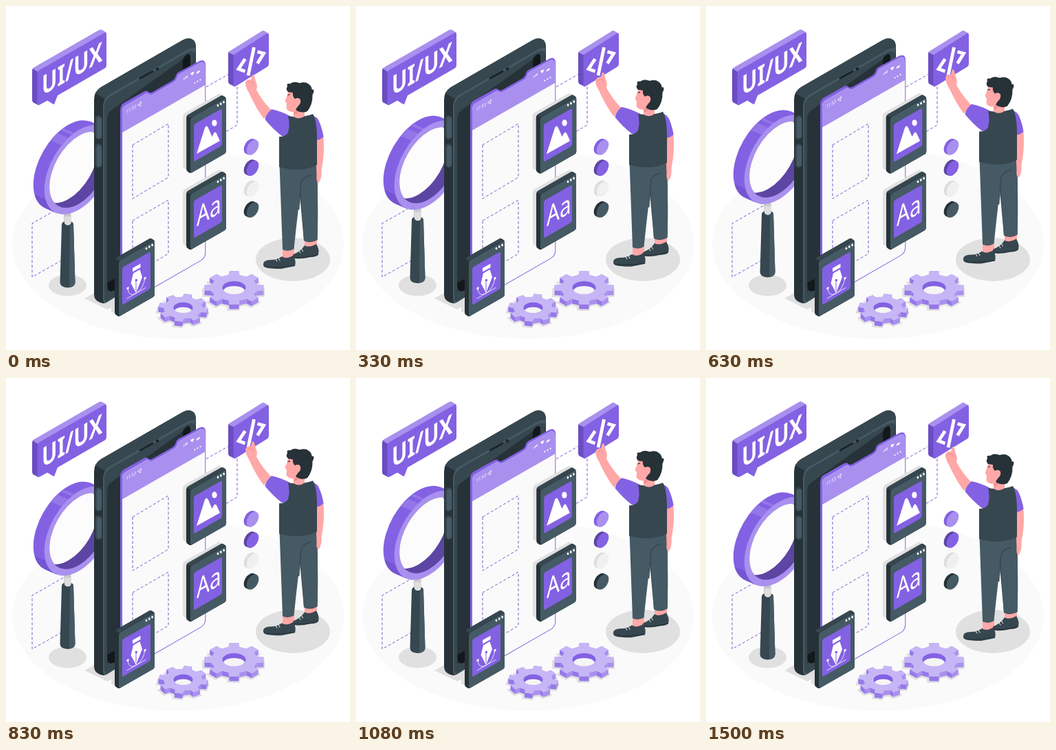
An HTML page that plays this animation: 500x500 px, repeating every 1540 ms.

```html
<!DOCTYPE html>
<html lang="en">
<head>
<meta charset="utf-8">
<title>UI/UX workspace</title>
<style>
html, body { margin: 0; width: 100%; height: 100%; overflow: hidden; background: #fff; }
svg { display: block; width: 100vw; height: 100vh; }
.p { fill: #8361e3 } .l { fill: #a990ef } .d { fill: #5d45a3 } .m { fill: #6a4dc0 }
.k { fill: #263238 } .g { fill: #37474f } .s { fill: #455a64 }
.skin { fill: #ffa8a7 } .w { fill: #fff } .sh { fill: #e0e0e0 }
.dash { fill: none; stroke: #7757cf; stroke-width: 1; stroke-dasharray: 4 3 }
.ln { fill: none; stroke: #fff; stroke-linecap: round; stroke-linejoin: round }
</style>
</head>
<body>
<svg viewBox="0 0 500 500" xmlns="http://www.w3.org/2000/svg">
<defs>
  <path id="shade" class="sh" d="M257 160Q257 157 260 155L308 128Q311 126 313 129L268 160V240L260 237Q257 236 257 233Z"/>
  <g id="card">
    <path class="k" d="M262 163Q262 159 265 157.500L312 130.500Q314 129 316 130.500L319 132.500Q320 133 320 136V211Q320 213.500 318 215L270 242.500Q268 243.500 266 242.500L264 241Q262 240 262 237Z"/>
    <path class="g" d="M263 159Q264 158 265 157.500L312 130.500Q314 129 316 130.500L319 132.500L268 162.500Z"/>
    <path class="s" d="M268 166Q268 163 270.500 161.500L317 134.500Q320 133 320 136V211Q320 213.500 318 215L270.500 242Q268 243 268 240Z"/>
    <path class="p" d="M273 175Q273 172.500 275 171L312 150Q314 149 314 151.500V200Q314 202.500 312 204L275 225.500Q273 226.500 273 224Z"/>
    <g class="w"><ellipse cx="308" cy="144.300" rx="1.300" ry="1.900"/><ellipse cx="312.300" cy="141.900" rx="1.300" ry="1.900"/><ellipse cx="316.600" cy="139.400" rx="1.300" ry="1.900"/></g>
  </g>
  <ellipse id="disc" rx="7.500" ry="12" transform="rotate(30)"/>
  <clipPath id="hole"><circle r="49.500" transform="matrix(.866 -.5 0 1 106 238)"/></clipPath>
</defs>

<ellipse cx="250" cy="346" rx="241" ry="138" fill="#fafafa"/>
<path class="dash" d="M89 287L38 316V394L89 365"/>
<g class="sh">
  <ellipse cx="89.500" cy="406" rx="27.500" ry="15.500"/>
  <ellipse cx="417" cy="368.500" rx="54" ry="31.500"/>
  <path d="M114 425L130 416L160 426V448L153 444V438L147 441Z"/>
</g>

<g id="glass">
  <path d="M84 298H94.500V318H84Z" fill="#c9c9c9"/>
  <path class="g" d="M81 318Q81 314 85 313.500L86 317Q89.500 320 94 317L94.500 313.500Q98 314 98 318L100.500 402Q100 409 89.500 409.500Q79 409 78.500 402Z"/>
  <path class="s" d="M93 319L98 316L100.500 402Q100 408 92 409.300Z"/>
  <path d="M85 306H94.500V316Q90 321 85 316Z" fill="#dedede"/>
  <g class="p">
    <circle r="58" transform="matrix(.866 -.5 0 1 90 231)"/>
    <path d="M57 294L73 301L139 175L123 168Z"/>
  </g>
  <g transform="matrix(.866 -.5 0 1 90 231)">
    <path d="M-41 41A58 58 0 0 1 -56 15l18.500 16.200A58 58 0 0 0 -22.500 57.200Z" fill="#7555d3"/>
    <path d="M-29 -50.200A58 58 0 0 1 -17.900 -55.200l18.500 16.200A58 58 0 0 0 -10.500 -34ZM-12.100 -56.700A58 58 0 0 1 -8.100 -57.400l18.500 16.200A58 58 0 0 0 6.400 -40.500Z" fill="#9476e8"/>
  </g>
  <circle class="l" r="58" transform="matrix(.866 -.5 0 1 106 238)"/>
  <circle class="d" r="49.500" transform="matrix(.866 -.5 0 1 106 238)"/>
  <g clip-path="url(#hole)"><circle r="49.500" transform="matrix(.866 -.5 0 1 91 231)" fill="#fcfcfc"/></g>
</g>

<g id="phone">
  <path class="k" d="M128 136Q128 124 138 118L256 50Q266 44 273 50Q276 53 276 62V350L146 431Q140 434 133 429Q128 426 128 419Z"/>
  <path class="g" d="M130 127Q133 121 138 118L256 50Q266 44 273 50Q276 53 276 62L144 135Z"/>
  <path class="s" d="M141 146Q141 135 150 129L256 68Q268 60 275 61V350L146 431Q141 433 141 426Z"/>
  <path class="g" d="M143 146Q143 137 152 131L262 68Q275 61 275 72V350L148 429Q143 431 143 424Z"/>
  <path class="k" d="M147 165Q147 155 154 151L262 74V340L147 415Z"/>
  <path d="M147.500 407Q148 417 156 414L170 406V390L147.500 402ZM257 80Q257 75 261 72Q268 66 268 76V90L257 92Z" fill="#12181b"/>
  <path d="M195 105L213 95" stroke="#1b2428" stroke-width="3" stroke-linecap="round"/>
  <circle cx="220" cy="91.500" r="2.300" fill="#1b2428"/>
  <path d="M134.500 164V189M134.500 205V230" stroke="#37474f" stroke-width="10" stroke-linecap="round"/>
  <path d="M135.500 165V189M135.500 206V230" stroke="#455a64" stroke-width="7" stroke-linecap="round"/>
</g>
<path class="dash" d="M285 121L336 92V173L285 203"/>

<g id="sheet">
  <path class="p" d="M166 152Q166 144 171 141L201 124Q205 122 207 125Q209 127 213 125L241 109Q246 106 247 101Q248 97.500 252 95.500L281 80Q290 76 290.300 87V358Q290.300 366 284 370L166 438Z"/>
  <path d="M169 155Q169 147 173 145L203 127.500Q206 126 208 128Q210 130 214 128L242 112Q248 109 249 103.500Q250 100 254 98L281 83Q289.300 79 289.300 89V358Q289.300 365 284 369L169 435Z" fill="#fafafa"/>
  <path class="l" d="M169 155Q169 147 173 145L203 127.500Q206 126 208 128Q210 130 214 128L242 112Q248 109 249 103.500Q250 100 254 98L281 83Q289.300 79 289.300 89V115L169 184Z"/>
  <text class="w" transform="matrix(.82 -.47 0 1 174.500 156.500)" font-family="'Open Sans', sans-serif" font-size="7">11:53</text>
  <path class="ln" stroke-width=".8" d="M191.500 144L196.500 139L195 146L193.800 144Z"/>
  <g class="w">
    <path d="M258 107.500V105.800L259.200 105V106.800ZM260.200 106.200V103.500L261.400 102.800V105.500ZM262.400 105V101.500L263.600 100.800V104.300Z"/>
    <path d="M268 98.500Q271 95 273.500 96L270.800 101Z"/>
    <path d="M277 96L281.500 93.300V96L277 98.700Z"/>
    <circle cx="274.500" cy="111.800" r="1.100"/><circle cx="278.500" cy="109.600" r="1.100"/><circle cx="282.500" cy="107.300" r="1.100"/>
  </g>
</g>
<path class="dash" d="M184 202L236 171V249L184 280ZM184 312L236 282V360L184 391Z"/>

<g id="photo">
  <use href="#shade"/>
  <use href="#card"/>
  <path class="w" d="M277 215L289 177Q291.500 172 294 177L299.500 190L302 185Q304 182 306 185L311 196Z"/>
  <ellipse class="w" cx="303" cy="170" rx="3.600" ry="4.600"/>
</g>
<use href="#shade" y="111"/>
<use href="#card" y="111"/>
<text class="w" transform="matrix(.76 -.44 0 1 277 320.500)" font-family="'Noto Sans', sans-serif" font-size="39">Aa</text>
<g>
  <use href="#card" x="-104" y="208"/>
  <path class="w" d="M184 381L195.500 374.500V380L184 386.500ZM185 388.500L194.500 383L198 394L189 417L181.500 403Z"/>
  <path d="M189 414V400" stroke="#8361e3" stroke-width="1"/><circle class="p" cx="189.300" cy="398.500" r="1.800"/>
  <path class="ln" stroke-width=".8" d="M177 410Q178 424 189 417.500Q200 411 202 395M176 425L203 409.500"/>
  <path class="w" d="M175.500 409.500L178.500 408V411L175.500 412.500ZM200.500 395L203.500 393.500V396.500L200.500 398Z"/>
</g>

<g id="gears"></g>
<g id="discs"></g>

<g id="bubble">
  <path class="m" d="M38 94Q38 91 40 90L47 95V144L40 140.500Q38 139.500 38 137Z"/>
  <path class="m" d="M58 134L61 133L70 143L66 141Z"/>
  <path class="l" d="M39 91Q40 89.500 42 88.500L135 35Q138 33.500 140 35L145 38L146 42L48 97Z"/>
  <path class="p" d="M45.500 98Q45.500 95 48 93.500L143 39Q146 37.500 146 41V86Q146 89 143.500 90.500L75 130L70 143L60 137.500L49 143.500Q45.500 145.500 45.500 142Z"/>
  <text class="w" transform="matrix(.76 -.44 0 1 52 130.500)" font-family="'Noto Sans', sans-serif" font-weight="600" font-size="39">UI/UX</text>
</g>
<g id="sign">
  <path class="m" d="M323 69Q323 66.500 325 66L332 70V117L325 113.500Q323 112.500 323 110Z"/>
  <path class="l" d="M323.500 67.500Q324 66 326 65L371 37Q374 35 376 36.500L381 39.500L331.500 71.500Z"/>
  <path class="p" d="M330.500 73Q330.500 71 333 69.500L379 40Q382 38.500 382 42V84Q382 87 379.500 88.500L334 116.500Q330.500 118.500 330.500 115Z"/>
  <path class="ln" stroke-width="4.800" style="stroke-linecap:butt;stroke-linejoin:miter" d="M347.500 77L338 91.500L347.500 95M360.500 60L352 101M365.500 66.500L374.500 69L365.500 83.500"/>
</g>

<g id="man">
  <path class="skin" d="M434 336H452V352H434ZM402 350H419V370H402Z"/>
  <path class="g" d="M434 348Q440 352 451 346Q456 354 454 361Q452 365 442 365Q430 368 421 367Q416 366 417.500 361Q428 357 434 348ZM401 364Q408 369 418 362Q422 371 420 378Q410 380 400 382Q384 382 377 380Q372 377 375 372Q378 369 385 369Q394 369 401 364Z"/>
  <path d="M375 378Q390 382 420 377M418 365Q436 367 454 361" fill="none" stroke="#263238" stroke-width="1.200"/>
  <path class="ln" stroke-width="1" d="M392 368L394 371M396 366.500L398 370M426 356L428 359M429.500 353L431.500 356.500"/>
  <path class="g" d="M424 240L433 341Q442 346 452.500 340Q454 300 452 232Z"/>
  <path class="s" d="M397.500 230L402 354Q410 358 418.500 353L422 320L428 268L433 341Q442 345 452.500 340Q454 305 452 230Z"/>
  <path d="M425.500 296L429 256Q433 248 443 246" fill="none" stroke="#37474f" stroke-width="1.500"/>
  <path class="skin" d="M449.500 194L461.500 190Q463.500 215 458.500 238Q459.500 250 454.500 257Q450.500 256 451.500 246Z"/>
  <path class="p" d="M444 159Q453 160 456.500 171Q460.500 182 461.500 190Q457 195 449.500 195Z"/>
  <path class="skin" d="M375 164Q364 150 353 126Q348 118 348 111Q351 106 356 107L357.500 101Q359.500 98 361 102L363 110Q366 115 364 122Q371 136 386 152Z"/>
  <path d="M351 111L358 110L360 116" fill="none" stroke="#f28f8f" stroke-width="1"/>
  <path class="p" d="M376.500 165Q378 157 386 150Q400 153 413 160L411 183Q407 190 401 189Q388 179 376.500 165Z"/>
  <path class="g" d="M410 160Q430 163 446 157Q452 166 452 194V231Q430 243 397 234V190Q406 190 410 184Q413 171 410 160Z"/>
  <path class="skin" d="M410 125Q409 130 406 137Q405.500 140 408 141L407.500 149Q410 154 418 154V161Q427 166 434 160L434 148L440 128L425 120Z"/>
  <path d="M418 154Q424 152 427 149Q425 157 418 158Z" fill="#f28f8f"/>
  <path d="M409.500 129.500L413 128.500" stroke="#263238" stroke-width="1.300"/>
  <path class="k" d="M410 125Q406 121 409 117Q407 112 413 113Q418 108.500 427 112Q435 109.500 440 113.500Q444 116 444.500 121L447.500 122Q447.500 126 445.500 129Q446 143 438 153Q430 157 421 151Q423 147 425 145Q429 142 428 136Q424 132 420 135Q416 131 417 126Z"/>
  <path class="skin" d="M420 137Q423 132 427 135Q429 141 424 145Q420 146 419 142Z"/>
</g>
</svg>
<script>
const byId = id => document.getElementById(id);
const put = (box, tag, attrs) => {
  const el = document.createElementNS('http://www.w3.org/2000/svg', tag);
  for (const name in attrs) el.setAttribute(name, attrs[name]);
  return box.appendChild(el);
};
const LIGHT = '#a990ef', MAIN = '#8361e3';

function gear(cx, cy, r, h, hole, turn) {
  const box = byId('gears'), pts = [], teeth = 8, step = Math.PI * 2 / teeth;
  for (let i = 0; i < teeth; i++) {
    for (const [a, k] of [[-.29, .78], [-.2, 1], [.2, 1], [.29, .78]]) {
      const t = turn + (i + a) * step;
      pts.push([cx + r * k * Math.cos(t), cy + r * k * .56 * Math.sin(t)]);
    }
  }
  const top = 'M' + pts.map(p => p.map(v => v.toFixed(1)).join(' ')).join('L') + 'Z';
  put(box, 'path', { d: top, transform: `translate(-1 ${h})`, fill: '#e0e0e0', stroke: '#e0e0e0', 'stroke-width': 5 });
  pts.map((p, i) => [p, pts[(i + 1) % pts.length]])
    .sort((a, b) => a[0][1] + a[1][1] - b[0][1] - b[1][1])
    .forEach(([p, q]) => put(box, 'path', {
      d: `M${p}L${q}v${h}L${p[0]} ${p[1] + h}Z`,
      fill: q[1] > p[1] ? LIGHT : '#9678e9'
    }));
  put(box, 'path', { d: top, fill: '#c6b6f6' });
  const ry = hole * .56, half = hole * Math.sqrt(1 - (h / 2 / ry) ** 2);
  put(box, 'ellipse', { cx, cy, rx: hole, ry, fill: MAIN });
  put(box, 'path', {
    d: `M${cx - half} ${cy + h / 2}A${hole} ${ry} 0 0 1 ${cx + half} ${cy + h / 2}A${hole} ${ry} 0 0 1 ${cx - half} ${cy + h / 2}Z`,
    fill: '#f5f5f5'
  });
}
gear(331.5, 409.5, 43.5, 7, 17, 0);
gear(257.5, 438.5, 36, 7, 14, .2);

[[LIGHT, MAIN], [MAIN, '#5d45a3'], ['#f0f0f0', '#dedede'], ['#455a64', '#263238']].forEach(([face, side], i) => {
  for (let j = 0; j <= 4; j++) {
    put(byId('discs'), 'use', { href: '#disc', fill: j < 4 ? side : face, transform: `translate(${354.5 + j} ${204 + i * 30.3 + j * .4})` });
  }
});

const LOOP = 1540, TICKS = 37, CYCLE = 36;
const floats = [['glass', 16], ['sheet', 8], ['man', 8]].map(([id, rise]) => [byId(id), rise]);
const photo = byId('photo');

function draw() {
  const tick = Math.floor(performance.now() % LOOP / LOOP * TICKS + .1);
  const angle = tick / CYCLE * Math.PI * 2;
  const lift = (1 - Math.cos(angle)) / 2;
  for (const [el, rise] of floats) el.setAttribute('transform', `translate(0 ${(-rise * lift).toFixed(2)})`);
  const size = 1 + .012 * Math.cos(angle - 2.1);
  photo.setAttribute('transform', `translate(291 187) scale(${size.toFixed(4)}) translate(-291 -187)`);
  requestAnimationFrame(draw);
}
draw();
</script>
</body>
</html>
```
